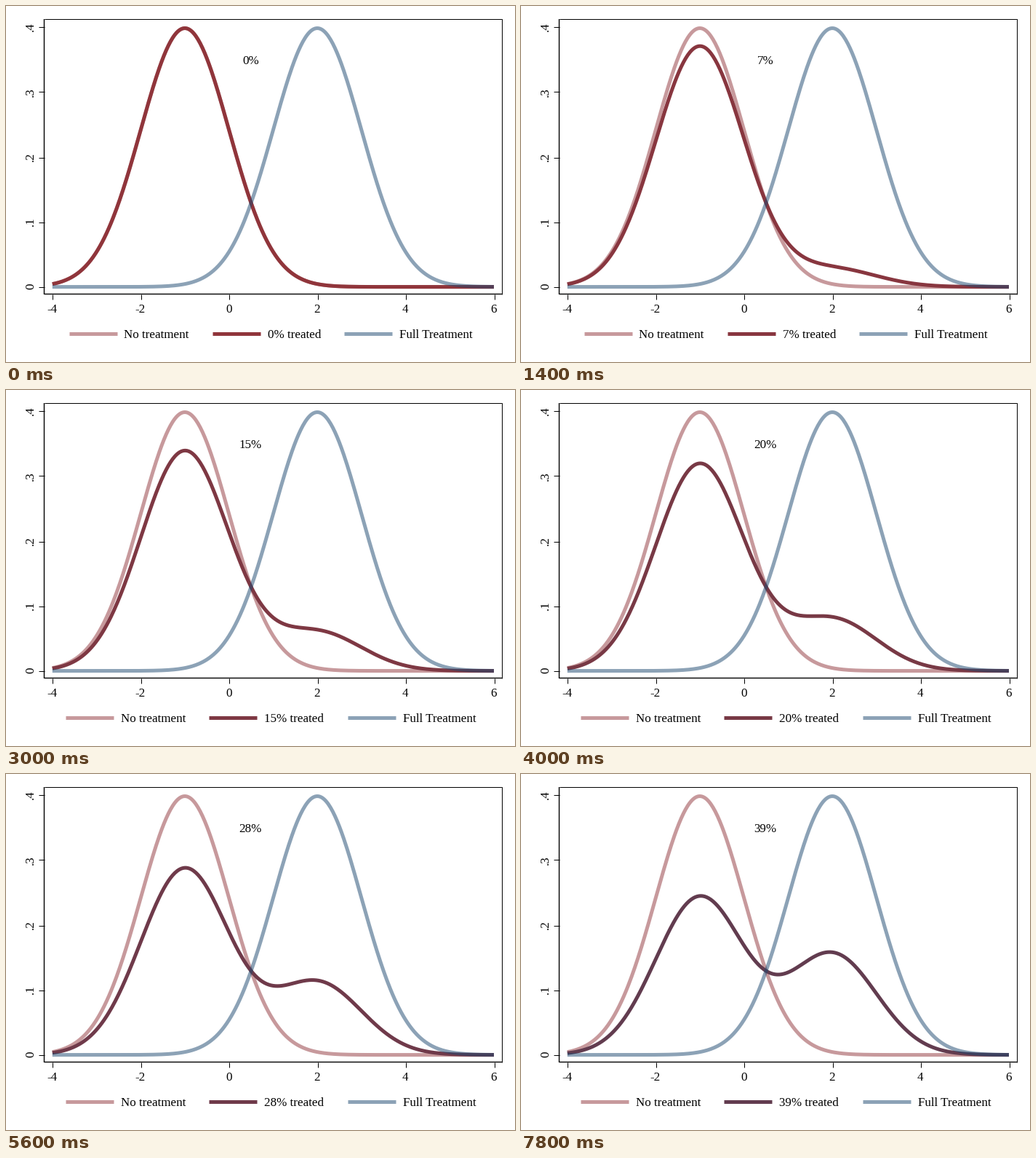
These frames come from a looping animation (700 by 490 pixels, 8000 ms). A matplotlib script:

```python
import numpy as np
import matplotlib.pyplot as plt
from matplotlib.animation import FuncAnimation

W, H, DPI = 700, 490, 100
PX = 72 / DPI
FRAMES, INTERVAL = 40, 200
MAROON = np.array([144, 53, 59]) / 255
NAVY = np.array([26, 71, 111]) / 255
LINE = 5.0

plt.rcParams["font.family"] = "Liberation Serif"
plt.rcParams["font.size"] = 17 * PX

fig = plt.figure(figsize=(W / DPI, H / DPI), dpi=DPI, facecolor="white")
ax = fig.add_axes([0, 0, 1, 1])
ax.set_xlim(0, W)
ax.set_ylim(H, 0)
ax.axis("off")


def sx(x):
    return 63.8 + 60.72 * (x + 4)


def sy(y):
    return 386.6 - 892.5 * y


def normal(x, mean):
    return np.exp(-(x - mean) ** 2 / 2) / np.sqrt(2 * np.pi)


def line(xs, ys, color, width, z, alpha=1.0, **kw):
    return ax.plot(xs, ys, color=color, lw=width * PX, alpha=alpha, zorder=z,
                   solid_capstyle="butt", solid_joinstyle="round", **kw)[0]


def label(x, y, text, ha="center", **kw):
    return ax.text(x, y, text, ha=ha, va="baseline", color="black",
                   zorder=6, **kw)


# Plot border, axes and ticks
L, T, R, B = 52.5, 18.5, 681.5, 396.5
line([L, R, R], [T, T, B], "black", 1, 1, snap=True)
line([L, L], [T - 0.5, B + 0.5], "black", 1.4, 1, snap=False)
line([L, R + 0.5], [B, B], "black", 1.4, 1, snap=False)
for v in range(-4, 7, 2):
    x = np.floor(sx(v)) + 0.5
    line([x, x], [B, 404], "black", 1, 1)
    label(sx(v) - 0.3, 422, str(v))
for i in range(5):
    y = np.floor(sy(i / 10)) + 0.5
    line([45, L], [y, y], "black", 1, 1)
    ax.text(38, sy(i / 10) - 0.5, f".{i}" if i else "0", rotation=90,
            rotation_mode="anchor", ha="center", va="baseline", zorder=6)

# Density curves
grid = np.linspace(-4, 6, 401)
before, after = normal(grid, -1), normal(grid, 2)
line(sx(grid), sy(before), MAROON, LINE, 2, 0.5)
mixed = line(sx(grid), sy(before), MAROON, LINE, 3)
line(sx(grid), sy(after), NAVY, LINE, 4, 0.5)

# Legend
keys = [line([], [], MAROON, LINE, 2, 0.5),
        line([], [], MAROON, LINE, 2),
        line([], [], NAVY, LINE, 2, 0.5)]
names = [label(0, 457, s, ha="left")
         for s in ("No treatment", "", "Full Treatment")]
counter = label(336.5, 80, "0%")


def update(pct):
    p = pct / 100
    color = (1 - p) * MAROON + p * NAVY
    mixed.set_ydata(sy((1 - p) * before + p * after))
    mixed.set_color(color)
    keys[1].set_color(color)
    counter.set_text(f"{pct}%")
    counter.set_x(336.5 if pct < 10 else 336)
    names[1].set_text(f"{pct}% treated")
    starts = (86.5, 283.7, 465) if pct < 10 else (82, 279.3, 469.7)
    for key, name, x in zip(keys, names, starts):
        key.set_data([x, x + 66], [451.3, 451.3])
        name.set_x(x + 76)
    return [mixed, counter, *keys, *names]


anim = FuncAnimation(fig, update, frames=FRAMES, interval=INTERVAL,
                     repeat=True, repeat_delay=0, blit=False)
plt.show()
```
